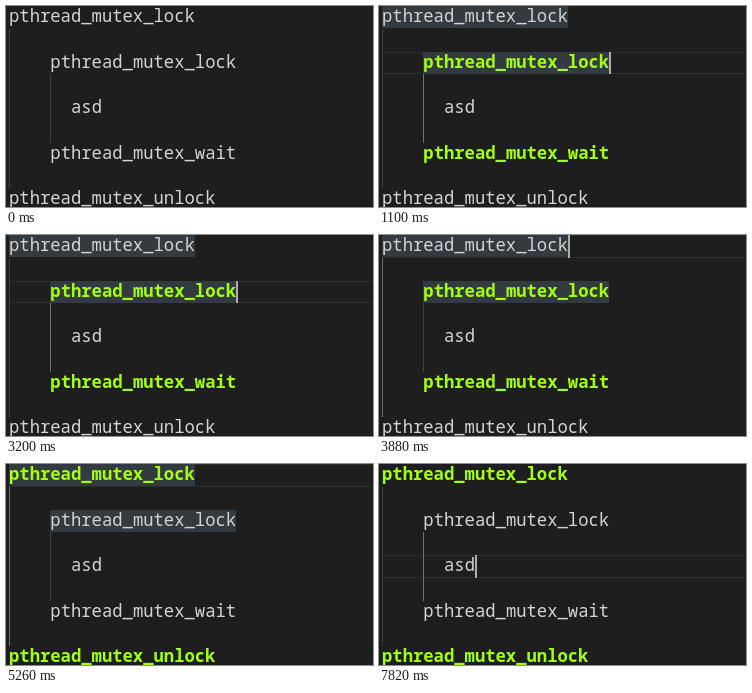
Recreate the animation shown at these times as an HTML page. Size 367 px wide and 201 px high, loop 8000 ms.

```html
<!DOCTYPE html>
<html lang="en">
<head>
<meta charset="utf-8">
<title>Matching keyword highlight</title>
<style>
  html, body { margin: 0; width: 100%; height: 100%; overflow: hidden; background: #1e1e1e; }
  svg { display: block; width: 100vw; height: 100vh; }
  text { font: 17.22px "Noto Sans Mono", "DejaVu Sans Mono", monospace; fill: #d4d4d4; white-space: pre; }
  text.match { font-weight: 700; fill: #a2ff10; }
</style>
</head>
<body>
<svg id="stage" viewBox="0 0 367 201"></svg>
<script>
const LOOP = 8000, CHAR = 10.333, LINE = 22.75, LEFT = 3;
const stage = document.getElementById("stage");

function add(tag, attrs) {
  const node = document.createElementNS("http://www.w3.org/2000/svg", tag);
  for (const key in attrs) node.setAttribute(key, attrs[key]);
  stage.append(node);
  return node;
}
const rect = (x, y, width, height, fill) => add("rect", { x, y, width, height, fill });
const show = (node, on) => node.setAttribute("visibility", on ? "visible" : "hidden");
const rowTop = row => Math.round(row * LINE);
const rowHeight = row => rowTop(row + 1) - rowTop(row);
const columnLeft = col => Math.round(LEFT + col * CHAR);

const lines = [
  [0, 0, "pthread_mutex_lock"],
  [2, 4, "pthread_mutex_lock"],
  [4, 6, "asd"],
  [6, 4, "pthread_mutex_wait"],
  [8, 0, "pthread_mutex_unlock"]
].map(([row, col, label]) => ({ row, col, label }));

const borders = [0, 1].map(() => rect(LEFT, 0, 364, 1, "#2c2c2c"));
const boxes = lines.slice(0, 2).map(({ row, col }) =>
  rect(columnLeft(col), rowTop(row), 186, 22, "#333a40"));
const guides = [[0, 1, 8], [4, 3, 6]].map(([col, from, to]) =>
  rect(columnLeft(col), rowTop(from), 1, rowTop(to) - rowTop(from)));
const texts = lines.map(({ row, col, label }) => {
  const node = add("text", { x: LEFT + col * CHAR, y: rowTop(row) + 16 });
  node.textContent = label;
  return node;
});
const caret = rect(0, 0, 2, 22, "#aeafad");

// line: caret line, match: bold pair, words: same-word boxes, guide: active guide
const states = [
  { at: 0, line: -1, match: [], words: false, guide: -1 },
  { at: 500, line: 1, match: [1, 3], words: false, guide: 1 },
  { at: 1100, line: 1, match: [1, 3], words: true, guide: 1 },
  { at: 3880, line: 0, match: [1, 3], words: true, guide: 0 },
  { at: 3900, line: 0, match: [0, 4], words: true, guide: 0 },
  { at: 7820, line: 2, match: [0, 4], words: false, guide: 1 }
];
const caretGaps = [[1900, 3200], [5260, 6660]];

function draw(time) {
  const state = states.filter(s => s.at <= time).pop();
  const active = lines[state.line];
  const blinkedOff = caretGaps.some(([from, to]) => time >= from && time < to);

  texts.forEach((node, i) =>
    node.setAttribute("class", state.match.includes(i) ? "match" : ""));
  guides.forEach((node, i) =>
    node.setAttribute("fill", i === state.guide ? "#707070" : "#404040"));
  boxes.forEach(node => show(node, state.words));
  borders.forEach(node => show(node, active));
  show(caret, active && !blinkedOff);
  if (!active) return;

  const y = rowTop(active.row), height = rowHeight(active.row);
  borders[0].setAttribute("y", y);
  borders[1].setAttribute("y", y + height - 1);
  caret.setAttribute("x", columnLeft(active.col + active.label.length));
  caret.setAttribute("y", y);
  caret.setAttribute("height", height);
}

const start = performance.now();
function tick() {
  draw((performance.now() - start) % LOOP);
  requestAnimationFrame(tick);
}
tick();
</script>
</body>
</html>
```
